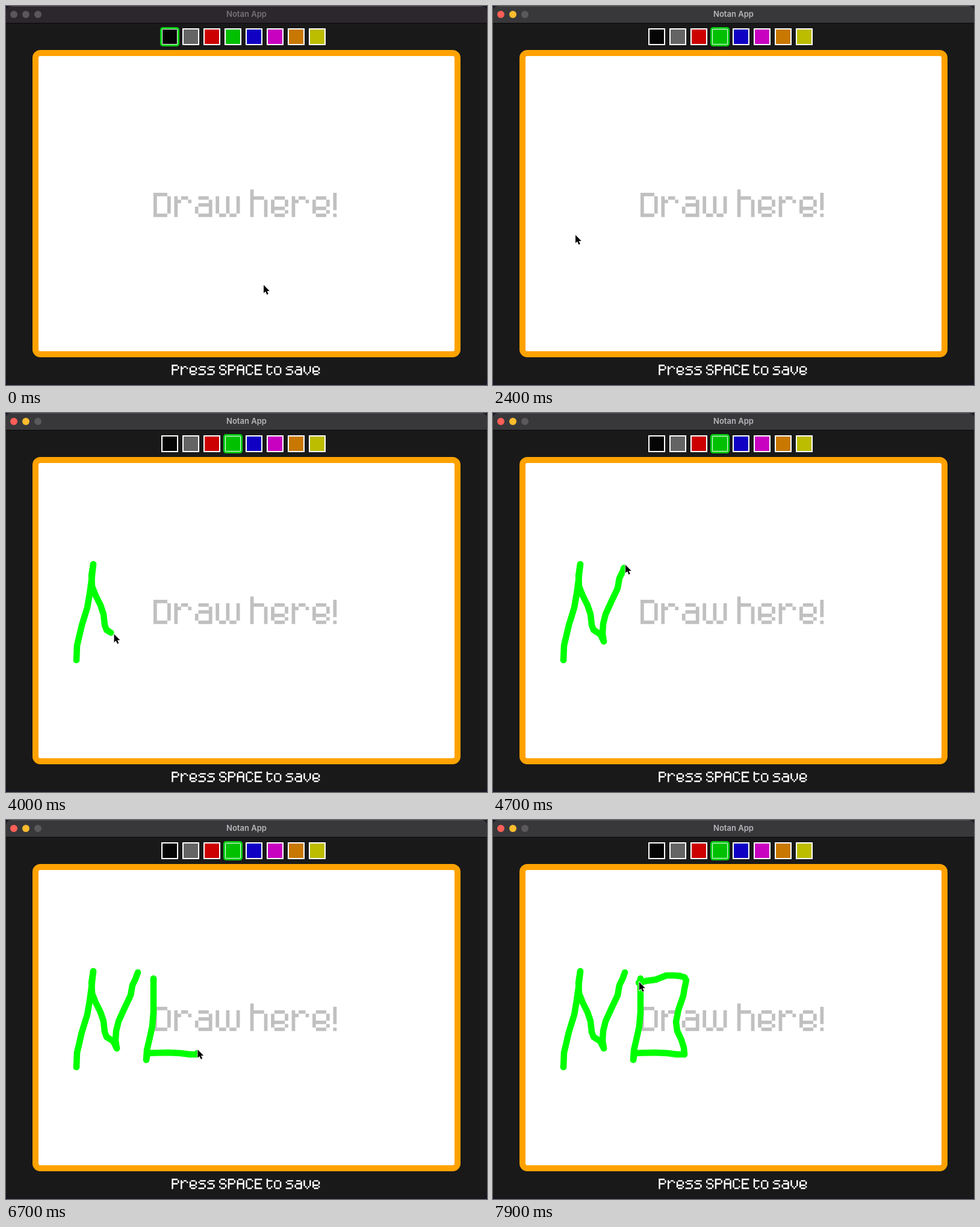
An HTML page for the animation above (8 s loop, 799 by 629 pixels).

```html
<!DOCTYPE html>
<html lang="en">
<head>
<meta charset="utf-8">
<title>Notan App</title>
<style>
  html, body { margin: 0; height: 100%; overflow: hidden; background: #171425; }
  svg { display: block; width: 799px; height: 629px; }
  #title { font: 600 13px Inter, sans-serif; text-anchor: middle; }
  .glyphs path { fill: none; stroke-linecap: square; }
  #ink path { fill: none; stroke: #0f0; stroke-width: 10.5; stroke-linecap: round; stroke-linejoin: round; }
</style>
</head>
<body>
<svg viewBox="0 0 799 629">
  <rect width="799" height="628" rx="9" fill="#191919"/>
  <path id="bar" d="M0 28V9Q0 0 9 0H790Q799 0 799 9V28Z"/>
  <path d="M8 .5H791" stroke="#58565a" stroke-opacity=".7"/>
  <path d="M0 28.5H799" stroke="#080808"/>
  <g id="lights"><circle cx="13" cy="14" r="6"/><circle cx="33" cy="14" r="6"/><circle cx="53" cy="14" r="6"/></g>
  <text id="title" x="399.5" y="18">Notan App</text>
  <g id="swatches"></g>
  <rect id="picked" y="36.5" width="29" height="29" rx="3" fill="none" stroke="#0c1a0c" stroke-width="3"/>
  <rect x="49" y="78" width="701" height="500" rx="8" fill="#fff" stroke="#ffa200" stroke-width="10"/>
  <g id="labels"></g>
  <g id="ink"></g>
  <path id="cursor" d="M0 0V13.6L3.1 10.8L5.4 16L7.8 15L5.6 9.9H9.8Z" stroke="#fff" stroke-width="1.6" paint-order="stroke"/>
</svg>
<script>
const $ = id => document.getElementById(id);

function add(parent, tag, attrs) {
  const el = document.createElementNS('http://www.w3.org/2000/svg', tag);
  for (const k in attrs) el.setAttribute(k, attrs[k]);
  return parent.appendChild(el);
}

// Block letters, drawn as strokes on a unit grid
const cap = 'M1 0H3', top_ = 'M1 1H3', mid = 'M1 3H3', foot = 'M1 6H3';
const glyphs = {
  D: cap + foot + 'M0 0V6M4 1V5',
  P: cap + mid + 'M0 0V6M4 1V2',
  S: cap + mid + foot + 'M4 1h0M0 1V2M4 4V5M0 5h0',
  A: cap + mid + 'M0 1V6M4 1V6',
  C: cap + foot + 'M4 1h0M0 1V5M4 5h0',
  E: mid + 'M4 0H0V6H4',
  a: top_ + mid + foot + 'M4 2V6M0 4V5',
  e: top_ + foot + 'M0 2V5M4 2V3M1 4H3M4 5h0',
  h: top_ + 'M0 -1V6M4 2V6',
  o: top_ + foot + 'M0 2V5M4 2V5',
  r: 'M0 1V6M1 2h0M2 1H3M4 2h0',
  s: mid + 'M1 1H4M0 2h0M4 4V5M0 6H3',
  t: top_ + 'M0 0V5M1 6H2M3 5h0',
  v: 'M0 1V4M4 1V4M1 5h0M3 5h0M2 6h0',
  w: 'M0 1V5M3 1V5M6 1V5M1 6H2M4 6H5',
  '!': 'M0 0V4M0 6h0'
};
const advance = { w: 8, t: 5, '!': 2, ' ': 2 };

function write(text, x, baseline, size, color) {
  const g = add($('labels'), 'g', {
    class: 'glyphs', role: 'img', 'aria-label': text, stroke: color,
    transform: `translate(${x} ${baseline}) scale(${size}) translate(.5 -6.5)`
  });
  let pos = 0;
  for (const c of text) {
    if (glyphs[c]) add(g, 'path', { d: glyphs[c], transform: `translate(${pos})` });
    pos += advance[c] || 6;
  }
}
write('Draw here!', 245, 350.3, 5.74, '#c0c0c0');
write('Press SPACE to save', 275.3, 612.4, 2.46, '#fff');

['#050505', '#646464', '#c00', '#00c000', '#1000c4', '#c800c0', '#c87800', '#bcbc00'].forEach((fill, i) =>
  add($('swatches'), 'rect', { x: 259 + 35 * i, y: 38, width: 26, height: 26, fill, stroke: '#fff', 'stroke-width': 2 }));

// Pointer journey: start, end, path, whether the pen is down
const moves = [
  [100, 1050, 'M428 463Q385 250 341 55'],
  [1080, 1800, 'M341 55Q358 66 373 57'],
  [1950, 2400, 'M373 57Q220 250 137 380'],
  [2400, 2800, 'M137 380Q120 392 118 409'],
  [2900, 2950, 'M117 410v-.5', 1],
  [3020, 3435, 'M117 410L118 386L126 352L135 323L139 300L142 278L145 251', 1],
  [3450, 4080, 'M145 251L142 270L143 288L149 303L157 319L162 334L164 352L167 360L178 367L184 379', 1],
  [4080, 4720, 'M184 379L182 366L183 350L187 334L197 312L207 291L210 274L215 264L219 253', 1],
  [4800, 5300, 'M220 252Q236 254 246 262'],
  [5480, 5520, 'M245 263v4', 1],
  [5620, 6060, 'M245 264V318L243 342L238 365L234 382L233 398', 1],
  [6060, 6500, 'M233 398L235 387L268 386L290 387L305 389', 1],
  [6500, 6690, 'M305 389H318', 1],
  [6690, 7400, 'M318 389L317 378L313 365L306 350L304 335L308 315L316 292L318 280L321 266L318 261L311 259', 1],
  [7400, 7900, 'M311 259L301 258L288 258L270 265L255 267L242 270', 1]
].map(([from, to, d, pen]) => {
  const path = add($('ink'), 'path', { d });
  if (!pen) path.style.stroke = 'none';
  return { from, to, path, pen, length: path.getTotalLength() };
});

function progress(m, t) {
  const p = Math.min(1, Math.max(0, (t - m.from) / (m.to - m.from)));
  return m.length * (m.pen ? p : p * p * (3 - 2 * p));
}

function draw(t) {
  const focused = t >= 2000;
  $('bar').setAttribute('fill', focused ? '#38383b' : '#2c272c');
  $('title').setAttribute('fill', focused ? '#b8b6ba' : '#777278');
  const lights = focused ? ['#ff5f57', '#febc2e', '#5a585b'] : ['#5a565a', '#5a565a', '#5a565a'];
  [...$('lights').children].forEach((c, i) => c.setAttribute('fill', lights[i]));
  $('picked').setAttribute('x', focused ? 362.5 : 257.5);
  $('picked').setAttribute('stroke', '#0c1');

  for (const m of moves) {
    if (!m.pen) continue;
    m.path.style.display = t < m.from ? 'none' : '';
    m.path.style.strokeDasharray = `${Math.max(.1, progress(m, t))} 9999`;
  }
  // The pointer runs slightly ahead of the ink
  const ahead = t + (t > 3000 ? 25 : 0);
  const m = moves.filter(m => m.from <= ahead).pop() || moves[0];
  const p = m.path.getPointAtLength(progress(m, ahead));
  const shift = m.pen ? 1 : 0;
  $('cursor').setAttribute('transform', `translate(${p.x + shift} ${p.y - shift})`);
}

function tick() {
  draw(Math.floor(performance.now() % 8000 / 100) * 100);
  requestAnimationFrame(tick);
}
tick();
</script>
</body>
</html>
```
